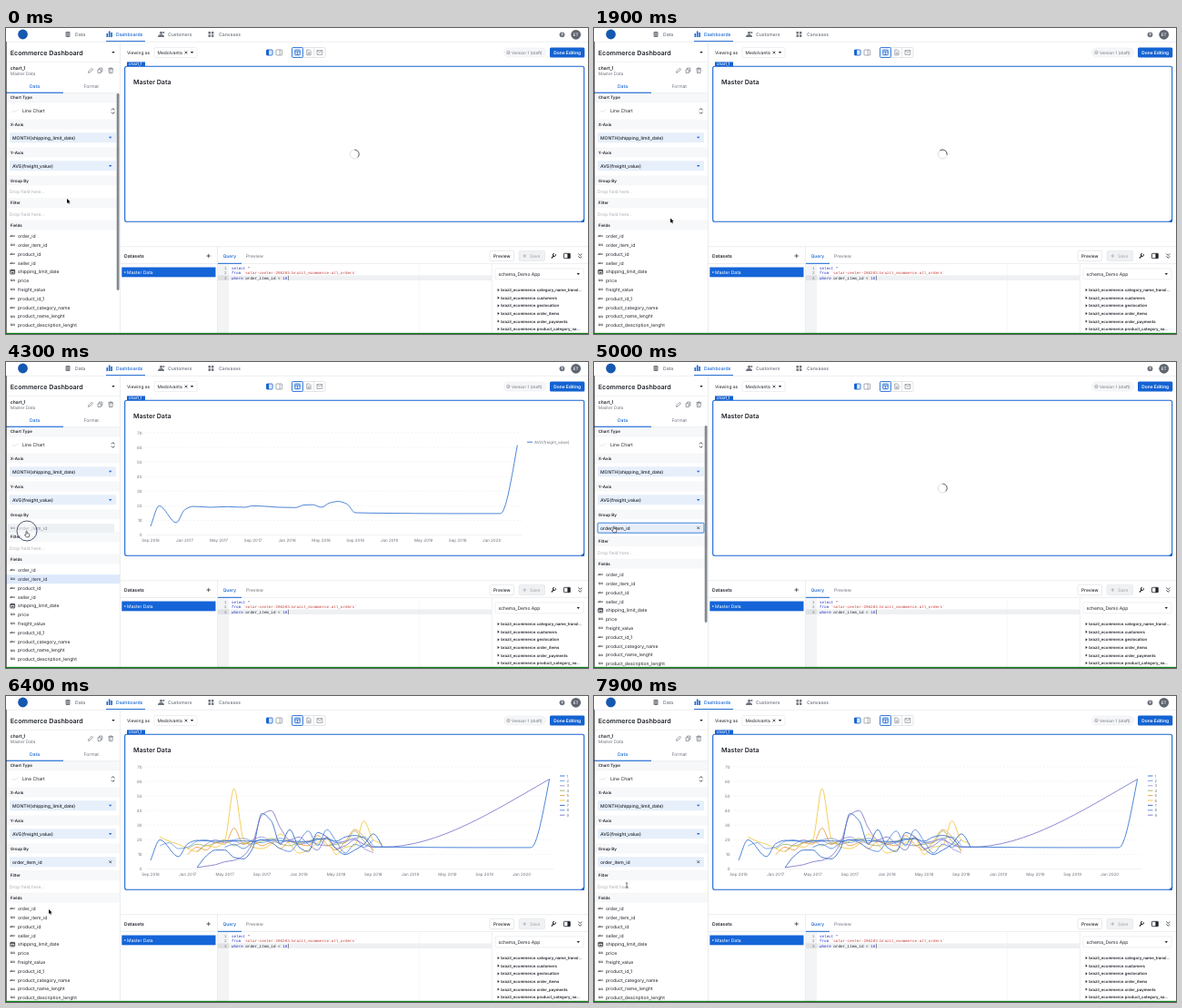
These frames come from a looping animation (640 by 337 pixels, 8000 ms). An HTML page:

```html
<!DOCTYPE html>
<html lang="en">
<head>
<meta charset="utf-8">
<title>Dashboard editor</title>
<style>
html, body { margin: 0; width: 100%; height: 100%; overflow: hidden; background: #fff; }
svg { display: block; width: 100vw; height: 100vh; font-family: Inter, sans-serif; text-rendering: geometricPrecision; }
text { white-space: pre; }
.mono { font-family: "Liberation Mono", monospace; }
</style>
</head>
<body>
<svg id="stage" viewBox="0 0 640 337" preserveAspectRatio="none"></svg>
<script>
const BLUE = '#1463d2', INK = '#20242b', GREY = '#6d737d', PALE = '#a9aeb6', LINE = '#e3e5e9', CHIP = '#e7effb';
const LOOP = 8000, DROP = 4800, PRESS = 3650, SHIFT = 5;
const LOADED = [2300, 5800];
const ROW = 9.8, FIRST_ROW = 229.3;

// Markup helpers; text is placed by its vertical centre.
const text = (x, y, s, size = 5, fill = INK, weight = 400, anchor = 'start', extra = '') =>
  `<text x="${x}" y="${y + size * 0.36}" font-size="${size}" fill="${fill}" font-weight="${weight}" text-anchor="${anchor}" ${extra}>${s}</text>`;
const rect = (x, y, w, h, fill = 'none', stroke = 'none', r = 0, sw = 0.6) =>
  `<rect x="${x}" y="${y}" width="${w}" height="${h}" rx="${r}" fill="${fill}" stroke="${stroke}" stroke-width="${sw}"/>`;
const path = (d, stroke = GREY, sw = 0.7, fill = 'none', extra = '') =>
  `<path d="${d}" fill="${fill}" stroke="${stroke}" stroke-width="${sw}" ${extra}/>`;
const circle = (x, y, r, fill = 'none', stroke = 'none', sw = 0.7) =>
  `<circle cx="${x}" cy="${y}" r="${r}" fill="${fill}" stroke="${stroke}" stroke-width="${sw}"/>`;
const caret = (x, y, fill = INK) => path(`M${x - 1.7} ${y - 0.9}h3.4l-1.7 2z`, 'none', 0, fill);
const cross = (x, y, r = 1.4) => path(`M${x - r} ${y - r}l${2 * r} ${2 * r}m0 ${-2 * r}l${-2 * r} ${2 * r}`, INK, 0.7);
const group = (id, content) => `<g id="${id}">${content}</g>`;

function topBar() {
  return circle(18.5, 7, 5.4, '#1558b0')
    + rect(65.5, 4, 5, 6, GREY, 'none', 1.2) + path('M65.5 6h5m-5 2h5', '#fff', 0.5)
    + text(76, 7, 'Data', 5.1, GREY, 500)
    + path('M110.5 10V6h1.6v4zm2.4 0V3.6h1.6V10zm2.4 0V5h1.6v5z', 'none', 0, BLUE)
    + text(121, 7, 'Dashboards', 5.1, BLUE, 500)
    + circle(170.5, 5.3, 1.5, GREY) + path('M167 10q0-3 3.5-3t3.5 3z', 'none', 0, GREY)
    + circle(173.3, 5, 1.1, GREY)
    + text(178, 7, 'Customers', 5.1, GREY, 500)
    + [0, 3.4].map(d => rect(222.5 + d, 4, 2.5, 2.5, GREY) + rect(222.5 + d, 7.4, 2.5, 2.5, GREY)).join('')
    + text(234, 7, 'Canvases', 5.1, GREY, 500)
    + circle(611.5, 7.3, 2.9, GREY) + text(611.5, 7.4, '?', 4.6, '#fff', 700, 'middle')
    + circle(626.7, 7.3, 5.4, '#5f6670') + text(626.7, 7.3, 'ET', 4.6, '#fff', 500, 'middle')
    + rect(110, 14, 43, 1, BLUE) + path('M0 15.3H640', LINE, 0.6);
}

function toolBar() {
  return text(133, 27, 'Viewing as', 4.9, INK)
    + rect(163, 21.5, 47, 11, '#fff', LINE, 1.5) + text(166.5, 27, 'Medolvanta', 4.9, INK)
    + cross(198, 27) + caret(204.5, 27)
    + rect(286.5, 24, 6.6, 6, '#dce9fb', BLUE, 0.8, 0.8) + rect(286.5, 24, 2.6, 6, BLUE)
    + rect(297, 24, 6.6, 6, '#fff', GREY, 0.8) + path('M301.2 24v6', GREY, 0.6)
    + rect(314.5, 21.5, 36.5, 11, '#fff', '#cfd3d9', 1.5) + path('M338.7 21.5v11', '#cfd3d9', 0.6)
    + rect(314.5, 21.5, 12, 11, '#e7effb', BLUE, 1.2, 0.8)
    + rect(317.8, 24.2, 5.4, 5.4, 'none', BLUE, 0.5, 0.8) + path('M317.8 26h5.4m-2.7 0v3.6', BLUE, 0.7)
    + path('M330.8 24h2.8l1.5 1.6v4.2h-4.3zm1 3h2.4m-2.4 1.4h2.4', GREY, 0.6)
    + path('M342 24.6h5.8v4.8H342zl2.9 2.5 2.9-2.5', GREY, 0.6)
    + rect(547.5, 22, 46, 10, '#f5f6f8', '#eceef1', 5)
    + circle(552.4, 27, 1.7, 'none', GREY, 0.5) + path('M551.6 27l.6.7 1.1-1.3', GREY, 0.5)
    + text(556, 27, 'Version 1 (draft)', 4.5, GREY)
    + rect(598, 21.5, 38.3, 11, BLUE, 'none', 1.5)
    + text(617.2, 27, 'Done Editing', 4.9, '#fff', 600, 'middle');
}

const header = (y, s) => rect(0, y - 5, 125, 10, '#f7f8fa') + path(`M0 ${y - 5}H125M0 ${y + 5}H125`, '#eef0f3', 0.4)
  + text(4.8, y, s, 4.5, INK, 600);
const chip = (y, s, end) => rect(4, y - 5.5, 117, 11, CHIP, 'none', 1) + text(7, y, s, 5.05, INK, 500) + end;
const hint = y => text(4, y, 'Drop field here...', 4.9, PALE);

function fieldRow([kind, name], i) {
  const y = FIRST_ROW + i * ROW;
  const icon = kind === 'date'
    ? rect(4.8, y - 2.2, 4.8, 4.6, 'none', INK, 0.5, 0.8) + path(`M4.8 ${y - 1.3}h4.8M5.8 ${y + 0.8}h2.8`, INK, 1)
    : text(7.2, y, kind, 3.2, INK, 700, 'middle');
  return icon + text(13, y, name, 5.05, INK);
}

const FIELDS = [['abc', 'order_id'], ['123', 'order_item_id'], ['abc', 'product_id'], ['abc', 'seller_id'],
  ['date', 'shipping_limit_date'], ['123', 'price'], ['123', 'freight_value'], ['abc', 'product_id_1'],
  ['abc', 'product_category_name'], ['123', 'product_name_lenght'], ['123', 'product_description_lenght']];

function sidebar() {
  return text(4.8, 27, 'Ecommerce Dashboard', 7.1, INK, 600) + caret(118, 27)
    + path('M0 37.3H125', LINE, 0.5)
    + text(4.8, 44, 'chart_1', 5, INK, 600) + text(4.8, 50.2, 'Master Data', 4.8, GREY)
    + path('M90.5 49.3l.4-1.7 3.3-3.3 1.3 1.3-3.3 3.3z', GREY, 0.7)
    + path('M101 45.8h3.4v3.6H101zM102.5 45.5v-1.4h3.4v3.8h-1.3', GREY, 0.7)
    + path('M113 45.2h4.4l-.4 4.4h-3.6zm-.4-.7h5.2m-3.3-.8h1.4m-1 2.5v2.5', GREY, 0.7)
    + text(31.5, 63.7, 'Data', 5, BLUE, 500, 'middle') + text(93.7, 63.7, 'Format', 5, GREY, 400, 'middle')
    + header(76.8, 'Chart Type') + rect(0, 70.7, 63, 1.1, BLUE) + path('M63 71.6H125', LINE, 0.5)
    + path('M6 93.3l2-2 2 1 3.5-2.8', '#c9cdd3', 0.5) + text(18, 91.5, 'Line Chart', 5.1, INK)
    + path('M116 90.4l1.7-1.8 1.7 1.8m0 2.2l-1.7 1.8-1.7-1.8', INK, 0.8)
    + header(106, 'X-Axis') + chip(120.7, 'MONTH(shipping_limit_date)', caret(114.7, 120.7, BLUE))
    + header(137, 'Y-Axis') + chip(151.8, 'AVG(freight_value)', caret(114.7, 151.8, BLUE))
    + header(168, 'Group By')
    + group('emptyGroup', hint(180.3))
    + group('filledGroup', chip(182.7, 'order_item_id', cross(114.7, 182.7))
      + group('focusRing', rect(4, 177.2, 117, 11, 'none', BLUE, 1, 0.8)))
    + group('lower', header(192.5, 'Filter') + hint(204.8) + header(217, 'Fields')
      + `<rect id="hover" width="125" height="${ROW}" fill="#dde9fb"/>` + FIELDS.map(fieldRow).join(''))
    + group('scrollbar', rect(121.7, 72, 2.8, 217, '#85898f', 'none', 1.4))
    + path('M125.5 15V337', LINE, 0.7);
}

function queryPanel() {
  const tables = ['category_name_transl...', 'customers', 'geolocation', 'order_items', 'order_payments', 'product_category_na...'];
  const code = (y, n, s) => text(242.5, y, n, 4.25, '#777', 400, 'end', 'class="mono"') + text(248, y, s, 4.25, INK, 400, 'start', 'class="mono"');
  const span = (fill, s) => `<tspan fill="${fill}">${s}</tspan>`;
  return path('M125.5 240.7H640M125.5 259.5H232.5M232.5 240.7V337', LINE, 0.7)
    + text(130, 251, 'Datasets', 5.1, INK, 600) + path('M220.5 251h4.4m-2.2-2.2v4.4', INK, 0.7)
    + rect(127.3, 263.5, 103.2, 10.8, '#1565d8') + circle(130.8, 269, 0.8, '#fff')
    + text(133, 269, 'Master Data', 5, '#fff')
    + text(238.5, 251, 'Query', 5, BLUE, 500) + text(264, 251, 'Preview', 5, GREY)
    + path('M232.5 259.5H640', LINE, 0.6) + rect(233, 258.8, 26, 1, BLUE)
    + rect(233, 260.5, 12, 76, '#f3f4f5') + rect(245, 272.4, 289, 5.6, '#eef0f2') + rect(233, 272.4, 12, 5.6, '#dfe1e4')
    + path('M454.3 261V336', '#e8e9eb', 0.4)
    + code(264, 1, span('#2330c8', 'select') + ' *')
    + code(269.6, 2, span('#2330c8', 'from') + span('#c33a36', ' `solar-center-296203.brazil_ecommerce.all_orders`'))
    + code(275.3, 3, span('#2330c8', 'where') + ' order_item_id &lt; ' + span('#2330c8', '10'))
    + rect(310, 272.8, 0.5, 5, INK)
    + rect(532, 245.3, 26.5, 11.3, '#fff', '#d8dbe0', 1.5) + text(545.3, 251, 'Preview', 4.9, INK, 500, 'middle')
    + rect(564, 245.3, 28.5, 11.3, '#f0f1f3', '#e0e2e6', 1.5)
    + path('M568.3 251h4m-2-2v4', PALE, 0.8) + text(576, 251, 'Save', 4.9, PALE, 500)
    + path('M599.8 253.5l2.8-2.8', INK, 1.2) + path('M604.4 249.3a1.6 1.6 0 1 1-1.5-1', INK, 1)
    + rect(613.5, 248.3, 6.8, 5.4, '#fff', INK, 0.6, 0.8) + rect(617.4, 248.3, 2.9, 5.4, INK)
    + path('M629.3 248.6l2 1.8 2-1.8m-4 2.8l2 1.8 2-1.8', INK, 0.8)
    + path('M534.3 260V337', LINE, 0.6)
    + rect(538, 264.8, 97, 12, '#fff', LINE, 1.5) + text(541.5, 271, 'schema_Demo App', 5, INK) + caret(629.3, 271)
    + tables.map((name, i) => {
      const y = 288.6 + i * 8.6;
      return path(`M540.6 ${y - 1.6}l2 1.6-2 1.6z`, 'none', 0, INK) + text(544.2, y, 'brazil_ecommerce.' + name, 4.3, INK, 600);
    }).join('');
}

// Monotone cubic through [x, y] points.
function smooth(points) {
  const slope = i => (points[i + 1][1] - points[i][1]) / (points[i + 1][0] - points[i][0]);
  const last = points.length - 1;
  const tangent = i => {
    if (i === 0) return slope(0);
    if (i === last) return slope(last - 1) * 1.4;
    const a = slope(i - 1), b = slope(i);
    return a * b <= 0 ? 0 : 2 * a * b / (a + b);
  };
  return points.map(([x, y], i) => {
    if (!i) return `M${x} ${y}`;
    const [px, py] = points[i - 1], h = (x - px) / 3;
    return `C${px + h} ${py + tangent(i - 1) * h} ${x - h} ${y - tangent(i) * h} ${x} ${y}`;
  }).join('');
}

const AVERAGE = [[0, 6], [1, 20], [3, 8.5], [4, 17.3], [5, 19.6], [7, 19], [9, 19.4], [11, 19], [12, 20], [14, 19.4], [15, 19],
  [17, 18.8], [18, 20.6], [19, 20.8], [20, 19], [21, 22], [22, 23], [23, 21.3], [24, 15.3], [27, 15], [35, 14.7], [41, 14.7], [43, 61.5]];

// [colour, first month, values per month, optional far end]
const SERIES = [
  ['#6f9be6', 1, [16, 18, 14, 15, 19, 20, 18, 19, 20, 21, 19, 18, 20, 21, 19, 17, 18, 20, 21, 18, 19, 21, 22, 16]],
  ['#9a92da', 5, [12, 17, 20, 18, 19, 17, 20, 22, 19, 18, 20, 17, 19, 17, 16, 18, 19, 21, 14, 11]],
  ['#9fb06a', 4, [14, 17, 16, 18, 20, 16, 18, 17, 19, 21, 17, 16, 18, 19, 21, 16, 17, 18, 26, 19, 13]],
  ['#e79a3c', 4, [10, 15, 13, 18, 17, 28, 17, 19, 16, 18, 14, 19, 17, 16, 23, 17, 13, 19, 27, 22, 12]],
  ['#f1c63c', 1, [22, 19, 17, 14, 12, 16, 15, 20, 55, 21, 15, 14, 17, 24, 17, 11, 13, 18, 21, 10, 15, 16, 33, 20, 17]],
  ['#2c66c4', 5, [1, 9, 13, 13, 8, 7, 14, 38, 33, 17, 27, 15, 12, 25, 22, 14, 10, 13, 17, 24, 15]],
  ['#4f86dc', 8, [15, 17, 14, 18, 20, 18, 14, 12, 19, 26, 16, 27, 19, 11, 17, 15, 20]],
  ['#7b74c9', 5, [1, 2, 3, 5, 6, 9, 18, 37, 40, 28, 20, 22, 17, 13, 22, 14, 16, 20, 17, 15, 15], [43, 61.5]]
];

function chart(id, step, right, lines, legend) {
  const yAt = v => 190.6 - v * 1.61;
  const labels = ['Sep 2016', 'Jan 2017', 'May 2017', 'Sep 2017', 'Jan 2018', 'May 2018', 'Sep 2018', 'Jan 2019', 'May 2019', 'Sep 2019', 'Jan 2020'];
  const rows = [0, 10, 20, 30, 40, 50, 60, 70].map(v =>
    path(`M154 ${yAt(v)}H${right}`, '#dfe2e6', 0.5, 'none', v ? 'stroke-dasharray="1.5 2.5"' : '')
    + text(149.6, yAt(v), v, 4.5, GREY, 400, 'end')).join('');
  const curves = lines.map(([colour, points]) =>
    path(smooth(points.map(([m, v]) => [159 + m * step, yAt(v)])), colour, 0.85)).join('');
  return group(id, rows + labels.map((s, i) => text(159 + i * 4 * step, 196.6, s, 4.5, GREY, 400, 'middle')).join('')
    + `<clipPath id="${id}Clip"><rect id="${id}Reveal" x="150" y="60" width="0" height="140"/></clipPath>`
    + `<g clip-path="url(#${id}Clip)">${curves}</g>` + legend);
}

function charts() {
  const MAIN = '#2f6fd0';
  const many = SERIES.map(([colour, start, values, end]) =>
    [colour, values.map((v, i) => [start + i, v]).concat(end ? [end] : [])]);
  const numbers = [MAIN, ...SERIES.map(s => s[0])].map((colour, i) =>
    path(`M609 ${88 + i * 5.4}h5.5`, colour, 0.9) + text(616.5, 88 + i * 5.4, i + 1, 4.2, GREY)).join('');
  return chart('single', 9.38, 567, [[MAIN, AVERAGE]], path('M573 88.2h6', MAIN, 0.9) + text(581, 88.2, 'AVG(freight_value)', 4.4, GREY))
    + chart('grouped', 10.2, 602, [...many, [MAIN, AVERAGE]], numbers);
}

const card = () => rect(133, 37.4, 20, 5, BLUE) + text(135, 39, 'chart_1', 4.4, '#fff', 500)
  + rect(130.7, 42.2, 505, 171, '#fff', BLUE, 2, 1.1) + path('M632.5 213.4l3-3v3z', BLUE, 0.8, BLUE)
  + text(140, 59.3, 'Master Data', 7.1, INK, 600);

const pointers = () => group('ghost', rect(2, -5, 117, 10, '#eceff3', 'none', 1) + text(7.2, 0, '123', 3.2, GREY, 700, 'middle') + text(13, 0, 'order_item_id', 5.05, GREY))
  + group('pointer', group('ring', circle(0, -2, 11, 'rgba(255,255,255,.35)', '#3a4660', 0.9))
    + group('arrow', path('M0 0v5l1.2-1.1.8 1.8.9-.4-.8-1.7h1.6z', '#fff', 0.5, '#000', 'paint-order="stroke"'))
    + group('hand', path('M-.9 1.5v-3q.6-.8 1.1 0v2l2 .5q.8.4.6 1.6l-.6 2.2h-2.9L-2.5 2.4q.2-1 1.6-.1z', '#111', 0.6, '#fff'))
    + group('beam', path('M-1.2-2.8q1.2 0 1.2.7v4.2q0 .7-1.2.7m2.4-5.6q-1.2 0-1.2.7m0 4.2q0 .7 1.2.7', '#222', 0.6)));

const stage = document.getElementById('stage');
stage.innerHTML = rect(0, 0, 640, 337, '#fff') + topBar() + toolBar() + sidebar() + queryPanel() + card() + charts()
  + group('spinner', circle(0, 0, 5, 'none', '#d5d8dc', 0.8) + path('M0-5A5 5 0 0 1 3.5 3.5', '#555b64', 0.9))
  + rect(0, 15, 0.6, 322, '#222') + rect(0, 335.8, 640, 1.2, '#0b7a14') + pointers();

const el = Object.fromEntries([...stage.querySelectorAll('[id]')].map(node => [node.id, node]));
const show = (node, on) => node.setAttribute('visibility', on ? 'visible' : 'hidden');
const move = (node, x, y, turn = 0) => node.setAttribute('transform', `translate(${x} ${y}) rotate(${turn})`);
const clamp = v => Math.min(1, Math.max(0, v));
const ease = v => v * v * (3 - 2 * v);

// Pointer stops: [time, x, y]
const STOPS = [[0, 67, 188], [600, 67, 188], [1900, 84, 209.5], [2250, 84, 209.5], [3000, 21, 264], [3150, 21, 264], [3550, 24, 240],
  [3700, 24, 240], [4300, 23, 188], [4800, 22, 183], [5700, 22, 183], [6400, 47, 235], [6850, 44, 262], [7050, 44, 262], [7650, 36, 208.5], [8000, 36, 208.5]];

function pointerAt(t) {
  const i = STOPS.findIndex(stop => stop[0] > t);
  const [t0, x0, y0] = STOPS[i - 1], [t1, x1, y1] = STOPS[i], k = ease((t - t0) / (t1 - t0));
  return [x0 + (x1 - x0) * k, y0 + (y1 - y0) * k];
}

function draw(t) {
  const [x, y] = pointerAt(t);
  const dropped = t >= DROP, dragging = t >= PRESS && !dropped;
  const single = t >= LOADED[0] && !dropped, grouped = t >= LOADED[1];
  const shift = dropped ? SHIFT : 0;

  show(el.single, single);
  show(el.grouped, grouped);
  el.singleReveal.setAttribute('width', 480 * ease(clamp((t - LOADED[0]) / 500)));
  el.groupedReveal.setAttribute('width', 480 * ease(clamp((t - LOADED[1]) / 500)));
  show(el.spinner, !single && !grouped);
  move(el.spinner, 383.3, 139, t * 0.36);

  show(el.emptyGroup, !dropped && !dragging);
  show(el.filledGroup, dropped);
  show(el.focusRing, dropped && t < 5800);
  move(el.lower, 0, shift);
  el.scrollbar.setAttribute('opacity', t < 1000 ? clamp((1000 - t) / 250) : dropped ? clamp((6100 - t) / 250) : 0);
  move(el.scrollbar, 0, dropped ? -2 : 0);

  const row = dragging ? 1 : Math.floor((y - shift - FIRST_ROW + ROW / 2) / ROW);
  const hovering = row >= 0 && !(t > 6000 && t < 6500);
  show(el.hover, hovering);
  el.hover.setAttribute('y', FIRST_ROW + row * ROW - ROW / 2);

  show(el.ghost, dragging);
  el.ghost.setAttribute('opacity', 0.85);
  move(el.ghost, x - 23, y - 5);
  move(el.pointer, x, y);
  const beam = t >= 7550, hand = !beam && (dragging || hovering || dropped && t < 5800);
  show(el.ring, dragging);
  show(el.beam, beam);
  show(el.hand, hand);
  show(el.arrow, !beam && !hand);
}

function tick(now) {
  draw(now % LOOP);
  requestAnimationFrame(tick);
}
draw(0);
requestAnimationFrame(tick);
</script>
</body>
</html>
```
